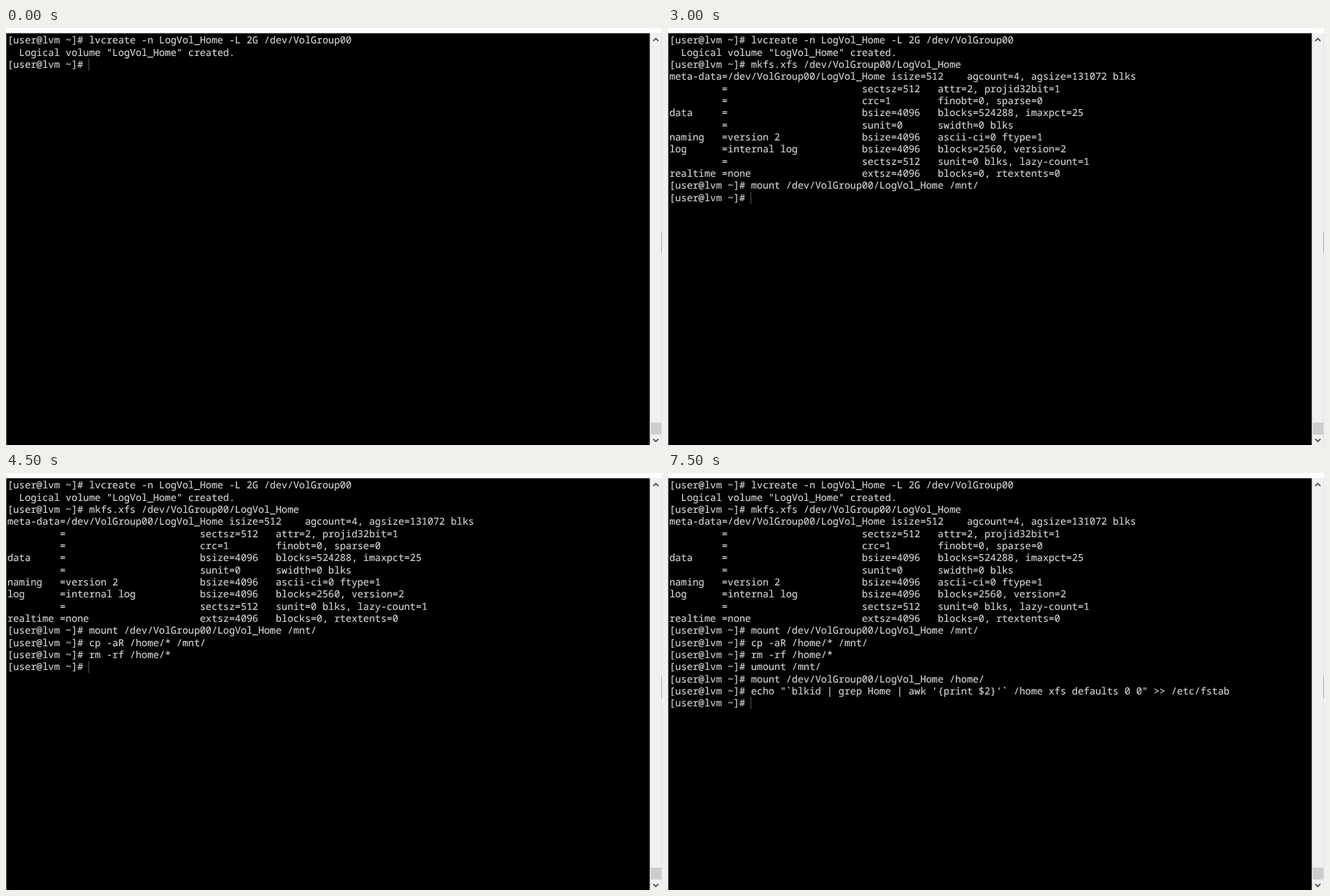
An HTML page for the animation above (8000 ms loop, 938 px wide and 597 px high).

```html
<!DOCTYPE html>
<html lang="en">
<head>
<meta charset="utf-8">
<title>Terminal session</title>
<style>
  html, body { margin: 0; width: 100%; height: 100%; overflow: hidden; background: #000; }
  svg { display: block; }
  text {
    font: 13.915px "Noto Sans Mono", monospace;
    fill: #d6d6d6;
    stroke: #d6d6d6;
    stroke-width: .15;
    white-space: pre;
    text-rendering: geometricPrecision;
  }
  .chevron { fill: none; stroke: #505050; stroke-width: 1.8; }
</style>
</head>
<body>
<svg width="938" height="597" viewBox="0 0 938 597">
  <rect width="938" height="597"/>
  <rect width="938" height="7.5" fill="#fff"/>
  <rect y="8" width="1" height="589" fill="#6a6a6a"/>
  <g id="screen"></g>
  <rect id="cursor" x="118" width="1" height="17" fill="#555"/>
  <rect x="920.5" y="7" width="17.5" height="590" fill="#f0f0f0"/>
  <rect x="922" y="565" width="15" height="17" fill="#cdcdcd"/>
  <rect x="937" y="8" width="1" height="589" fill="#e0e0e0"/>
  <rect x="937" y="292" width="1" height="30" fill="#a0a0a0"/>
  <path class="chevron" d="M925.5 18.7l3.7-3.7 3.7 3.7M925.5 588.3l3.7 3.7 3.7-3.7"/>
</svg>
<script>
const LOOP = 8000, STEP = 1500;
const LEFT = 1.9, BASELINE = 22.3, LINE_HEIGHT = 17.333;
const PROMPT = "[user@lvm ~]# ";
const command = text => PROMPT + text;
const row = (label, value, size, details) =>
  label.padEnd(9) + ("=" + value).padEnd(24) + size.padEnd(13) + details;

// Each step adds its lines to the screen at once.
const steps = [
  [
    command("lvcreate -n LogVol_Home -L 2G /dev/VolGroup00"),
    '  Logical volume "LogVol_Home" created.',
  ],
  [
    command("mkfs.xfs /dev/VolGroup00/LogVol_Home"),
    "meta-data=/dev/VolGroup00/LogVol_Home isize=512    agcount=4, agsize=131072 blks",
    row("", "", "sectsz=512", "attr=2, projid32bit=1"),
    row("", "", "crc=1", "finobt=0, sparse=0"),
    row("data", "", "bsize=4096", "blocks=524288, imaxpct=25"),
    row("", "", "sunit=0", "swidth=0 blks"),
    row("naming", "version 2", "bsize=4096", "ascii-ci=0 ftype=1"),
    row("log", "internal log", "bsize=4096", "blocks=2560, version=2"),
    row("", "", "sectsz=512", "sunit=0 blks, lazy-count=1"),
    row("realtime", "none", "extsz=4096", "blocks=0, rtextents=0"),
  ],
  [command("mount /dev/VolGroup00/LogVol_Home /mnt/")],
  [command("cp -aR /home/* /mnt/"), command("rm -rf /home/*")],
  [command("umount /mnt/"), command("mount /dev/VolGroup00/LogVol_Home /home/")],
  [command("echo \"`blkid | grep Home | awk '{print $2}'` /home xfs defaults 0 0\" >> /etc/fstab")],
];

const screen = document.getElementById("screen");
const cursor = document.getElementById("cursor");
let shownStep = -1;

function show(step) {
  const lines = [...steps.slice(0, step + 1).flat(), PROMPT];
  screen.replaceChildren(...lines.map((line, i) => {
    const text = document.createElementNS("http://www.w3.org/2000/svg", "text");
    text.setAttribute("x", LEFT);
    text.setAttribute("y", Math.round(BASELINE + i * LINE_HEIGHT));
    text.textContent = line;
    return text;
  }));
  cursor.setAttribute("y", Math.round(BASELINE + (lines.length - 1) * LINE_HEIGHT) - 13);
}

function tick() {
  const step = Math.floor(performance.now() % LOOP / STEP);
  if (step !== shownStep) show(shownStep = step);
  requestAnimationFrame(tick);
}
tick();
</script>
</body>
</html>
```
